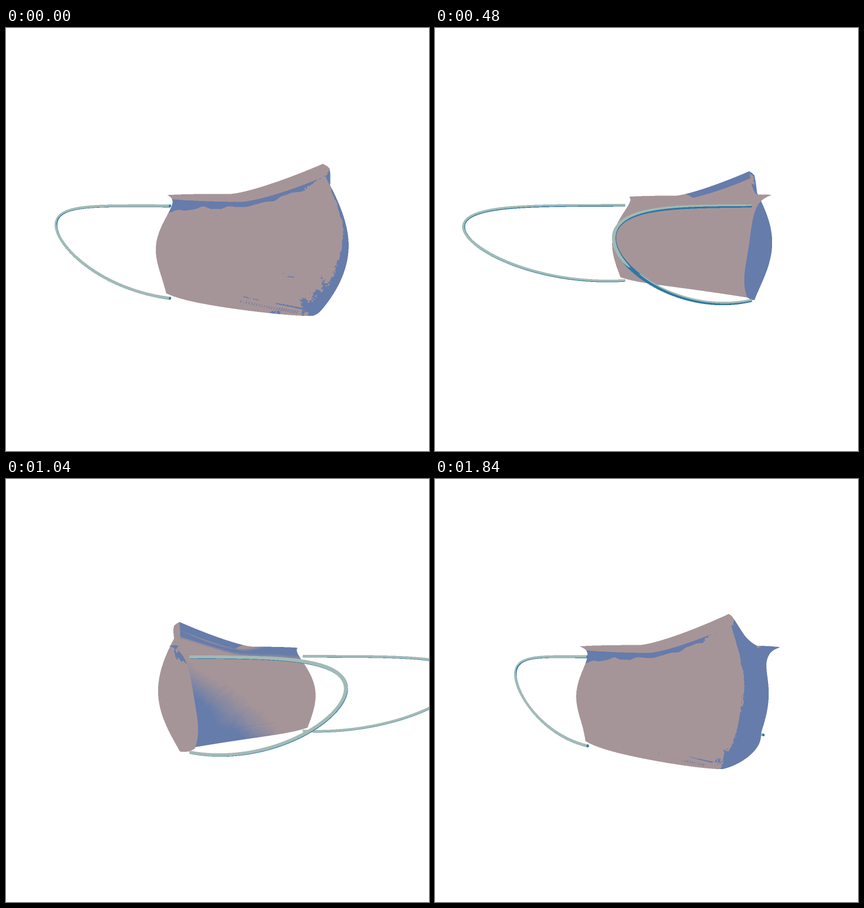
An HTML page with a canvas that plays this animation: 748x748 px, repeating every 1920 ms.

```html
<!DOCTYPE html>
<html lang="en">
<head>
<meta charset="utf-8">
<title>Turning face mask</title>
<style>
html, body { margin: 0; width: 100%; height: 100%; overflow: hidden; background: #fff; }
canvas { display: block; width: 748px; height: 748px; }
</style>
</head>
<body>
<canvas id="stage" width="748" height="748"></canvas>
<script>
const stage = document.getElementById('stage').getContext('2d');
const LOOP = 1920, STEP = 80, STEPS = LOOP / STEP;
const CX = 436, CY = 374, DIST = 1150, TILT = 0.057, TOP = 230, SS = 2;
const W = 748 * SS, H = 292 * SS;
const RAD = Math.PI / 180;

const MAUVE = [166, 149, 152], BLUE = [102, 124, 171];
const CORD = [162, 186, 181], CORD_DARK = [47, 120, 165];

const { sin, cos, exp, abs, min, max, floor, PI } = Math;
const clamp = (v, a, b) => max(a, min(b, v));
const mixed = (a, b, f) => a + (b - a) * f;
const sub = (a, b) => a.map((v, i) => v - b[i]);
const cross = (a, b) => [a[1]*b[2] - a[2]*b[1], a[2]*b[0] - a[0]*b[2], a[0]*b[1] - a[1]*b[0]];
const unit = a => { const l = Math.hypot(...a) || 1; return a.map(v => v / l); };

// edges and profiles: s runs from ridge (0) to ear (1), t from top (0) to bottom (1)
const topEdge = s => 79 - 2 * s ** 6 + 47 * max(0, 1 - 1.9 * s) ** 1.4;
const bottomEdge = s => -115 + 28 * s ** 1.3 + 6 * s ** 10;
const ridge = t => 215 - 0.0042 * (116 - 241 * t) ** 2 + 20 * exp(-(((t - 0.03) / 0.045) ** 2));
const earEdge = t => -24 + 0.004 * (108 - 163 * t) ** 2;
const halfWidth = t => 172 + 20 * exp(-t / 0.04) + 13 * sin(PI * t) ** 2;

// side, height, forward
function maskPoint(side, t) {
  const s = abs(side), bend = s ** (1.4 - 0.4 * exp(-t / 0.2));
  const sag = 16 * sin(PI * s) * exp(-t / 0.15);
  return [
    side * halfWidth(t) * (1.11 - 0.11 * s * s),
    mixed(topEdge(s), bottomEdge(s), t),
    mixed(ridge(t), earEdge(t), bend) - sag
  ];
}

function cordPoint(side, f) {
  const a = PI * f, out = sin(a);
  return [side * (171 + 62 * out), -14 + 74 * cos(a) + 37 * out * out, -2 - 299 * out];
}

function grid(nx, ny, make) {
  const verts = [];
  for (let j = 0; j <= ny; j++)
    for (let i = 0; i <= nx; i++) verts.push(make(i / nx, j / ny));
  return { nx, ny, verts };
}

const shell = grid(80, 64, (a, t) => {
  const s = a * 2 - 1, e = 0.006;
  const ds = sub(maskPoint(min(1, s + e), t), maskPoint(max(-1, s - e), t));
  const dt = sub(maskPoint(s, min(1, t + e)), maskPoint(s, max(0, t - e)));
  return { p: maskPoint(s, t), n: unit(cross(dt, ds)), s: abs(s), t };
});

const cords = [1, -1].map(side => grid(10, 120, (a, f) => {
  const dir = unit(sub(cordPoint(side, f + 0.004), cordPoint(side, f - 0.004)));
  const n1 = unit(cross(dir, [1, 0, 0])), n2 = cross(dir, n1), turn = a * 2 * PI;
  const n = n1.map((v, k) => v * cos(turn) + n2[k] * sin(turn));
  return { p: cordPoint(side, f).map((v, k) => v + 2.5 * n[k]), n, s: 0, t: 0 };
}));

// fabric relief: noise, seams and an embossed label
const TW = 600, TH = 400;
const outer = new Float32Array(TW * TH), inner = new Float32Array(TW * TH);

function hash(x, y) {
  const v = sin(x * 127.1 + y * 311.7) * 43758.5453;
  return v - floor(v);
}
function noise(x, y) {
  const ix = floor(x), iy = floor(y), ease = v => v * v * (3 - 2 * v);
  const u = ease(x - ix), v = ease(y - iy);
  const row = j => mixed(hash(ix, iy + j), hash(ix + 1, iy + j), u);
  return mixed(row(0), row(1), v) - 0.5;
}

function drawMarks() {
  const c = document.createElement('canvas');
  c.width = TW; c.height = TH;
  const g = c.getContext('2d', { willReadFrequently: true });
  const line = (width, dash, ...pts) => {
    g.lineWidth = width;
    g.setLineDash(dash);
    g.beginPath();
    pts.forEach(([s, t]) => g.lineTo(s * TW, t * TH));
    g.stroke();
  };
  g.strokeStyle = g.fillStyle = '#fff';
  line(3, [], [.15, .12], [.15, .29], [.5, .16], [.5, .11]);
  line(3, [9, 5], [.01, .5], [.012, .9]);
  line(3, [], [.28, .7], [.33, .69], [.47, .42]);
  line(4, [], [.1, .95], [.6, .87], [1, .86]);
  line(9, [3, 7], [.15, .975], [.6, .92]);
  line(2, [4, 5], [.62, .92], [1, .9]);
  g.setLineDash([]);
  g.save();
  g.translate(.48 * TW, .15 * TH);
  g.rotate(-.2);
  g.scale(-1, 1);
  g.font = 'bold 23px "Liberation Sans", Arial, sans-serif';
  g.fillText('LUMO-VEC FP3', 0, 0);
  g.restore();
  return g.getImageData(0, 0, TW, TH).data;
}

function buildRelief() {
  const marks = drawMarks();
  for (let y = 0, i = 0; y < TH; y++) for (let x = 0; x < TW; x++, i++) {
    const s = x / TW, t = y / TH;
    const grain = 0.36 * noise(s * 7 + t * 4, t * 6 - s * 3) +
      0.26 * noise(s * 34 + t * 20, t * 16) + 0.18 * noise(s * 120, t * 85);
    const base = grain - 0.35 * marks[i * 4 + 3] / 255;
    const wide = s ** 5;
    const from = 0.07 - 0.03 * wide, to = 0.108 + 0.065 * wide + 0.03 * noise(s * 18, 3);
    outer[i] = base;
    if (t < from) outer[i] += 0.35;
    else if (t < to) outer[i] -= 1.15 * clamp(s * 5 - 0.1, 0, 1);
    inner[i] = base - (t < 0.04 && s < 0.45 ? 1.1 : 0);
  }
}
buildRelief();

const work = document.createElement('canvas');
work.width = W; work.height = H;
const wctx = work.getContext('2d');
const depth = new Float32Array(W * H);

// turn, project and light every vertex
function project(mesh, angle, isCord) {
  const sn = sin(angle), cs = cos(angle);
  const swing = cos(2 * (angle - 160 * RAD));
  const soft = swing < -0.6;
  const lit = (x, y, z, limit, up) => z * sin(limit) - x * cos(limit) + up * y;
  for (const v of mesh.verts) {
    const [u, y, w] = v.p, [nu, ny, nw] = v.n;
    const x = w * sn + u * cs, z = w * cs - u * sn, k = 1 / (1 - z / DIST);
    v.x = (CX + x * k) * SS;
    v.y = (CY - (y - TILT * z) * k - TOP) * SS;
    v.z = z;
    const nx = nw * sn + nu * cs, nz = nw * cs - nu * sn;
    if (isCord) v.out = nz * 0.75 - nx * 0.45 + ny * 0.6 - 0.12;
    else {
      v.out = lit(nx, ny, nz, 27 * RAD, 0.3);
      v.in = lit(-nx, -ny, -nz, (29 + 25 * swing) * RAD, soft ? -0.3 : 0.3);
    }
  }
  return soft;
}

function triangle(px, a, b, c, isCord, soft) {
  const area = (b.x - a.x) * (c.y - a.y) - (b.y - a.y) * (c.x - a.x);
  if (abs(area) < 1e-6) return;
  const front = isCord || area > 0, key = front ? 'out' : 'in', relief = front ? outer : inner;
  const hi = isCord ? CORD : MAUVE, lo = isCord ? CORD_DARK : BLUE;
  const x0 = max(0, Math.ceil(min(a.x, b.x, c.x) - 0.5));
  const x1 = min(W - 1, floor(max(a.x, b.x, c.x) - 0.5));
  const y0 = max(0, Math.ceil(min(a.y, b.y, c.y) - 0.5));
  const y1 = min(H - 1, floor(max(a.y, b.y, c.y) - 0.5));
  for (let y = y0; y <= y1; y++) for (let x = x0; x <= x1; x++) {
    const qx = x + 0.5 - a.x, qy = y + 0.5 - a.y;
    const kb = (qx * (c.y - a.y) - qy * (c.x - a.x)) / area;
    const kc = ((b.x - a.x) * qy - (b.y - a.y) * qx) / area;
    const ka = 1 - kb - kc;
    if (min(ka, kb, kc) < -1e-5) continue;
    const at = name => ka * a[name] + kb * b[name] + kc * c[name];
    const z = at('z'), i = y * W + x;
    if (z <= depth[i]) continue;
    depth[i] = z;
    const light = at(key);
    let mix = light > 0 ? 1 : 0;
    if (!isCord) {
      const tx = clamp(floor(at('s') * TW), 0, TW - 1), ty = clamp(floor(at('t') * TH), 0, TH - 1);
      const bump = relief[ty * TW + tx];
      if (soft && !front) mix = clamp(0.5 + (light + (bump < -0.7 ? bump : bump * 0.1)) / 0.24, 0, 1);
      else mix = light + bump > 0 ? 1 : 0;
    }
    for (let k = 0; k < 3; k++) px[i * 4 + k] = mixed(lo[k], hi[k], mix);
    px[i * 4 + 3] = 255;
  }
}

function fill(px, mesh, angle, isCord) {
  const soft = project(mesh, angle, isCord), { nx, ny, verts } = mesh;
  for (let j = 0; j < ny; j++) for (let i = 0; i < nx; i++) {
    const k = j * (nx + 1) + i;
    const a = verts[k], b = verts[k + 1], c = verts[k + nx + 1], d = verts[k + nx + 2];
    triangle(px, a, b, c, isCord, soft);
    triangle(px, b, d, c, isCord, soft);
  }
}

const poses = [];
function pose(step) {
  if (poses[step]) return poses[step];
  const angle = (40 + step * 360 / STEPS) * RAD;
  const img = wctx.createImageData(W, H);
  depth.fill(-1e9);
  fill(img.data, shell, angle, false);
  cords.forEach(c => fill(img.data, c, angle, true));
  wctx.putImageData(img, 0, 0);
  const small = document.createElement('canvas');
  small.width = W / SS; small.height = H / SS;
  small.getContext('2d').drawImage(work, 0, 0, W / SS, H / SS);
  return poses[step] = small;
}

let shown = -1;
function frame() {
  const step = floor(performance.now() % LOOP / STEP);
  if (step !== shown) {
    stage.fillStyle = '#fff';
    stage.fillRect(0, 0, 748, 748);
    stage.drawImage(pose(step), 0, TOP);
    shown = step;
  }
  requestAnimationFrame(frame);
}
frame();
</script>
</body>
</html>
```
